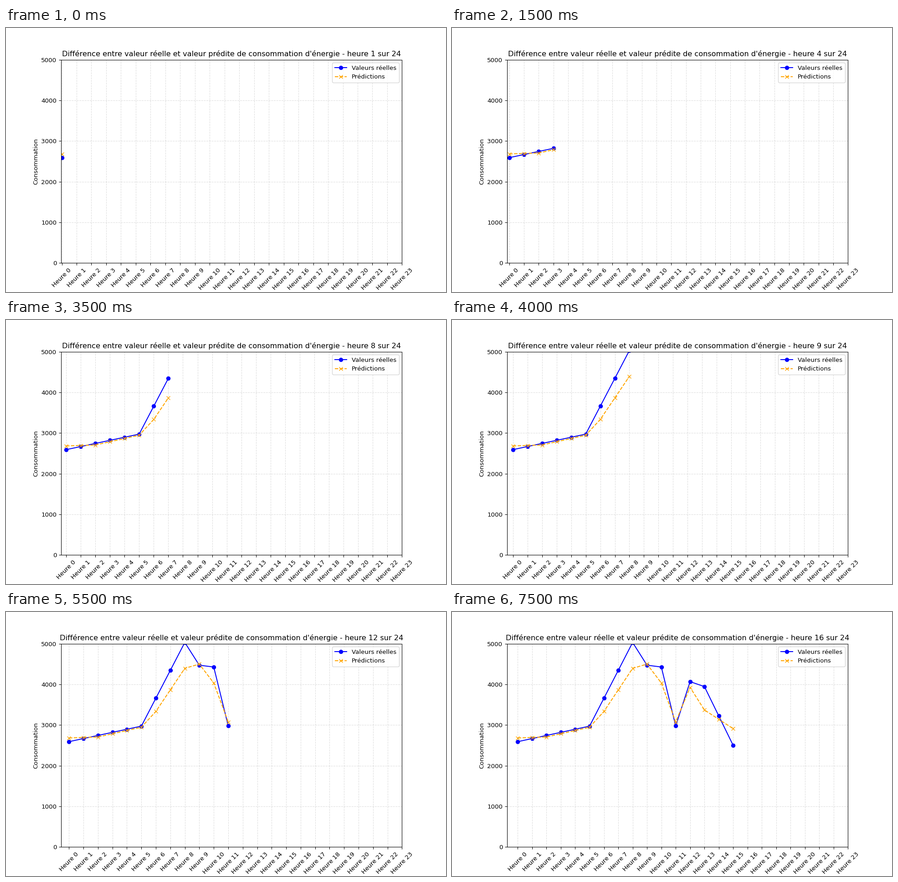
These frames come from a looping animation (966 px wide and 580 px high, 8000 ms). A matplotlib script:

```python
import numpy as np
import matplotlib.pyplot as plt
from matplotlib.animation import FuncAnimation

DPI = 96.6
STEPS = 16
INTERVAL = 500
HOURS = 24

hours = np.arange(STEPS)


def curve(*knots):
    """Hourly values along straight runs between (hour, value) turning points."""
    return np.interp(hours, *zip(*knots))


# Slow night rise, morning climb to a peak, midday dip, afternoon decline.
actual = curve((0, 2590), (5, 2972), (8, 5030), (9, 4471), (10, 4426),
               (11, 2976), (12, 4066), (13, 3945), (15, 2500))
predicted = curve((0, 2682), (2, 2705), (5, 2945), (6, 3333), (8, 4394),
                  (9, 4498), (10, 4033), (11, 3075), (12, 3926),
                  (13, 3370), (15, 2910))

fig, ax = plt.subplots(figsize=(966 / DPI, 580 / DPI), dpi=DPI)
actual_line, = ax.plot([], [], color="blue", marker="o", label="Valeurs réelles")
predicted_line, = ax.plot([], [], color="orange", marker="x", linestyle="--",
                          label="Prédictions")

ax.set_ylim(0, 5000)
ax.set_ylabel("Consommation")
ax.set_xticks(range(HOURS), [f"Heure {h}" for h in range(HOURS)], rotation=45)
ax.grid(True, linestyle="--", alpha=0.4)
ax.legend(loc="upper right")


def update(k):
    shown = slice(k + 1)
    actual_line.set_data(hours[shown], actual[shown])
    predicted_line.set_data(hours[shown], predicted[shown])
    # The left margin is 5% of the plotted span; the last tick fixes the right edge.
    ax.set_xlim(-0.05 * max(k, 1.1), HOURS - 1)
    ax.set_title("Différence entre valeur réelle et valeur prédite de "
                 f"consommation d'énergie - heure {k + 1} sur {HOURS}")
    return actual_line, predicted_line


anim = FuncAnimation(fig, update, frames=STEPS, interval=INTERVAL,
                     repeat=True, repeat_delay=0)
plt.show()
```
